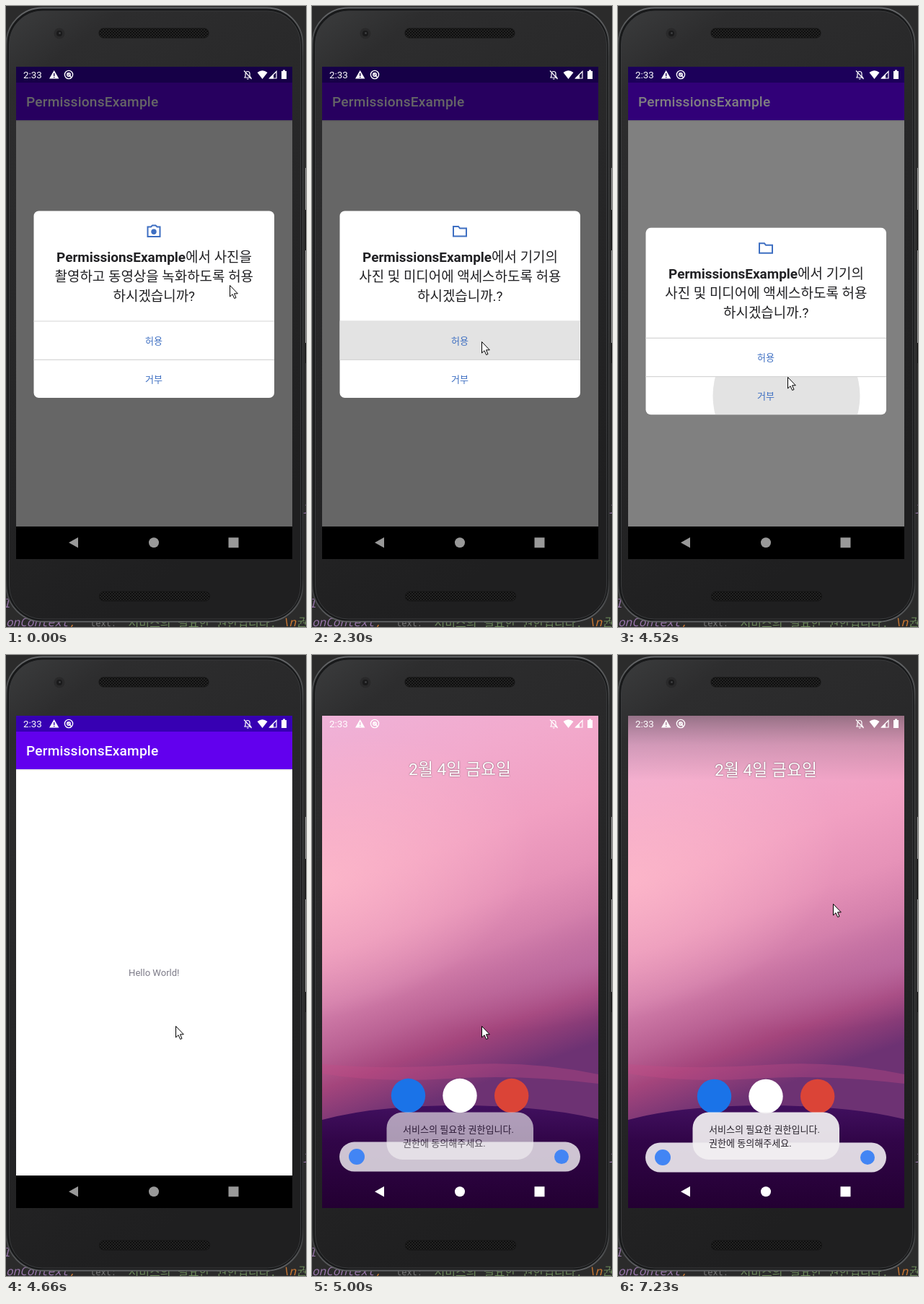
An HTML page that plays this animation: 416x859 px, repeating every 7480 ms.

```html
<!DOCTYPE html>
<html lang="ko">
<head>
<meta charset="utf-8">
<style>
html, body { margin: 0; width: 100%; height: 100%; overflow: hidden; background: #2b2b2b; }
svg { display: block; width: 416px; height: 859px; }
text { font-family: Roboto, "Noto Sans CJK KR", "Noto Sans CJK", sans-serif; white-space: pre; }
.code { font: italic 16px "Noto Sans Mono", "Noto Sans CJK KR", monospace; }
.ask { font-size: 18.95px; fill: #212124; text-anchor: middle; }
.button { font-size: 13.05px; fill: #3e6fc2; text-anchor: middle; }
.note { font-size: 13.05px; fill: #28232c; }
.icon { fill: none; stroke: #3e6fc2; stroke-width: 2; }
</style>
</head>
<body>
<svg viewBox="0 0 416 859">
  <defs>
    <linearGradient id="body" x2=".35" y2="1">
      <stop stop-color="#3b3c3d"/><stop offset=".12" stop-color="#2d2d2e"/><stop offset="1" stop-color="#1f1f20"/>
    </linearGradient>
    <linearGradient id="rim" x2="0" y2="1">
      <stop stop-color="#66686a"/><stop offset=".08" stop-color="#3b3c3d"/><stop offset=".93" stop-color="#303132"/><stop offset="1" stop-color="#606264"/>
    </linearGradient>
    <linearGradient id="sky" x2=".2" y2="1">
      <stop stop-color="#efb2d8"/><stop offset=".17" stop-color="#f2aacd"/><stop offset=".34" stop-color="#f1a0c2"/>
      <stop offset=".47" stop-color="#e692b8"/><stop offset=".57" stop-color="#d37fab"/><stop offset=".66" stop-color="#ba6294"/>
      <stop offset=".73" stop-color="#a4457c"/><stop offset=".83" stop-color="#6d3273"/>
    </linearGradient>
    <radialGradient id="glow" gradientUnits="userSpaceOnUse" cx="0" cy="0" r="1" gradientTransform="translate(14 310) rotate(-15) scale(300 190)">
      <stop stop-color="#ffbccb" stop-opacity=".75"/><stop offset="1" stop-color="#ffbccb" stop-opacity="0"/>
    </radialGradient>
    <radialGradient id="dusk" gradientUnits="userSpaceOnUse" cx="0" cy="0" r="1" gradientTransform="translate(397 425) rotate(-15) scale(250 75)">
      <stop stop-color="#c47cb4" stop-opacity=".4"/><stop offset="1" stop-color="#c47cb4" stop-opacity="0"/>
    </radialGradient>
    <linearGradient id="hills" x2="0" y2="1">
      <stop stop-color="#41105f"/><stop offset=".35" stop-color="#310548"/><stop offset="1" stop-color="#230032"/>
    </linearGradient>
    <linearGradient id="shade" x2="0" y2="1">
      <stop stop-color="#5a4852" stop-opacity=".6"/><stop offset=".45" stop-color="#745767" stop-opacity=".25"/><stop offset="1" stop-color="#745767" stop-opacity="0"/>
    </linearGradient>
    <pattern id="mesh" width="4" height="4" patternUnits="userSpaceOnUse">
      <rect width="4" height="4" fill="#232323"/><circle cx="1" cy="1" r="1.1" fill="#0b0b0b"/><circle cx="3" cy="3" r="1.1" fill="#0b0b0b"/>
    </pattern>
    <clipPath id="screen"><path d="M14 84H397V765H14z"/></clipPath>
    <clipPath id="allowArea"><path d="M38.5 436.5H371.5V489H38.5z"/></clipPath>
    <clipPath id="denyArea"><path d="M38.5 489.5H371.5V535a7 7 0 0 1-7 7H45.5a7 7 0 0 1-7-7z"/></clipPath>
  </defs>

  <rect width="416" height="859" fill="#2b2b2b"/>
  <text class="code" y="832" x="-4" fill="#9876aa">l</text>
  <text class="code" y="702" x="411" fill="#9876aa">l</text>
  <text class="code" y="858" fill="#9876aa">onContext<tspan fill="#cc7832">,</tspan></text>
  <text class="code" x="117" y="858" fill="#787878" style="font-style:normal;font-size:12px">text:</text>
  <text class="code" x="160" y="859" fill="#6a8759" style="font-style:normal">"서비스의 필요한 권한입니다.</text>
  <text class="code" x="383" y="858" fill="#cc7832">\n<tspan fill="#6a8759">권</tspan></text>
  <path d="M415.5 224V282M415.5 338V466" stroke="#999"/>
  <path d="M415.5 282V338M415.5 466V494" stroke="#111"/>

  <rect x=".5" y="2.5" width="411" height="849" rx="50" fill="#18191a" stroke="url(#rim)" stroke-width="2"/>
  <rect x="4.5" y="7" width="404" height="841" rx="46" fill="url(#body)" stroke="#3a3b3d"/>
  <circle cx="74" cy="38" r="7.5" fill="#29292a"/><circle cx="74" cy="38" r="4" fill="#1a1a1b"/><circle cx="74.5" cy="37.5" r="1.3" fill="#444648"/>
  <rect x="129" y="31" width="152" height="13" rx="6" fill="url(#mesh)" stroke="#151515"/>
  <rect x="129.5" y="810" width="153" height="13" rx="6" fill="url(#mesh)" stroke="#151515"/>

  <g clip-path="url(#screen)">
    <g id="home">
      <rect x="14" y="84" width="383" height="681" fill="url(#sky)"/>
      <rect x="14" y="84" width="383" height="560" fill="url(#glow)"/>
      <rect x="14" y="84" width="383" height="560" fill="url(#dusk)"/>
      <path d="M14 566Q110 574 205 567T397 580V593Q290 580 190 586T14 579z" fill="#c44c84" opacity=".35"/>
      <path d="M14 643Q60 631 110 627Q205 619 300 627Q350 631 397 642V765H14z" fill="url(#hills)"/>
      <rect id="topShade" x="14" y="84" width="383" height="90" fill="url(#shade)"/>
      <g id="content">
        <text x="205" y="166.5" text-anchor="middle" font-size="22.8" fill="#fff" style="text-shadow:0 0 2px #0008">2월 4일 금요일</text>
        <rect id="search" x="38" y="674.5" width="334" height="41" rx="20.5" fill="#f3f1f4"/>
        <circle cx="62" cy="695" r="11" fill="#4285f4"/>
        <circle cx="346" cy="695" r="10" fill="#4285f4"/>
        <circle cx="133.5" cy="610.5" r="23.7" fill="#1a73e8"/>
        <circle cx="205" cy="610.5" r="23.7" fill="#fff"/>
        <circle cx="276.7" cy="610.5" r="23.7" fill="#db4437"/>
      </g>
    </g>

    <g id="app">
      <rect x="14" y="84" width="383" height="640" fill="#fff"/>
      <text x="205.3" y="444" text-anchor="middle" font-size="13.05" fill="#7d7b88">Hello World!</text>
      <rect x="14" y="158" width="383" height="1.5" opacity=".09"/>
      <rect x="14" y="106" width="383" height="52" fill="#6200ee"/>
      <rect x="14" y="84" width="383" height="22" fill="#3700b3"/>
      <text x="28" y="139.3" font-size="19.1" font-weight="500" letter-spacing=".2" fill="#fff">PermissionsExample</text>
      <rect id="scrim" x="14" y="84" width="383" height="640"/>
      <rect x="14" y="720" width="383" height="45"/>
    </g>

    <g id="dialog">
      <rect x="38.5" y="283.5" width="333.5" height="258.5" rx="7" fill="#fff"/>
      <g clip-path="url(#allowArea)"><circle id="allowWave" cx="235" cy="463" fill="#e3e3e3"/></g>
      <g clip-path="url(#denyArea)"><circle id="denyWave" cx="233.5" cy="516" fill="#e3e3e3"/></g>
      <path d="M38.5 436H372M38.5 489.3H372" stroke="#d6d6d6" stroke-width="1.2"/>
      <g id="camera">
        <path class="icon" d="M197 305.5H201L203 303.5H207.5L209.5 305.5H213.5V319H196.5V305.5z"/>
        <circle cx="205" cy="312.3" r="3.7" fill="#3e6fc2"/>
      </g>
      <path id="folder" class="icon" d="M196 305H203L205 307.5H214V318.5H196z"/>
      <text class="ask" x="205.5" y="353.5"><tspan font-weight="700">PermissionsExample</tspan>에서 <tspan id="line1"></tspan></text>
      <text class="ask" id="line2" x="205.3" y="380.5"></text>
      <text class="ask" id="line3" x="205.3" y="407.5"></text>
      <text class="button" x="205" y="467.5">허용</text>
      <text class="button" x="205" y="520.5">거부</text>
    </g>

    <g fill="#fff">
      <text x="24" y="100" font-size="13.4">2:33</text>
      <path d="M60 100.5L66.7 89L73.4 100.5zM66 93V97H67.4V93zM66 98V99.3H67.4V98z" fill-rule="evenodd"/>
      <g fill="none" stroke="#fff" stroke-width="1.4">
        <circle cx="87" cy="95" r="5.6"/><circle cx="87" cy="95" r="2.3"/><path d="M85 93L91 99"/>
        <path d="M331 99H339.5L338 97V93.5Q338 90.5 335 90.5T332 93.5V97zM330 89.5L340.5 101M334 101H336.5" stroke-width="1.2"/>
        <path d="M365.5 100H375V90.5z" stroke-width="1.2"/>
      </g>
      <path d="M348.5 92Q355.5 86.5 362.5 92L355.5 101z"/>
      <path d="M365 100.5L371 94.5V100.5z"/>
      <path d="M382 90H384V88.5H387V90H389V101H382z"/>
    </g>
    <g id="nav"><path d="M87 742.3L100 735V749.6z"/><circle cx="205" cy="742.3" r="7"/><rect x="308.5" y="735.3" width="14" height="14"/></g>

    <g id="toast">
      <rect x="103.5" y="632.5" width="203.5" height="65.5" rx="22" fill="#f1eff2" opacity=".93"/>
      <text class="note" x="126" y="660.5">서비스의 필요한 권한입니다.</text>
      <text class="note" x="126" y="679.5">권한에 동의해주세요.</text>
    </g>
  </g>

  <path id="cursor" d="M.5.5V16L4 12.7L6.7 18.5L9 17.5L6.500 11.8H11.3z" fill="#fff" stroke="#000"/>
</svg>
<script>
const LOOP = 7480;
const el = id => document.getElementById(id);
const set = (id, attrs) => { for (const k in attrs) el(id).setAttribute(k, attrs[k]); };
const span = (t, a, b) => Math.min(1, Math.max(0, (t - a) / (b - a)));
const mix = (a, b, p) => a + (b - a) * p;
const easeOut = p => 1 - (1 - p) ** 2;

// time, x, y of the pointer tip
const path = [
  [0, 310, 386], [60, 310, 386], [200, 299, 463], [850, 299, 463], [1400, 285, 380], [1540, 283, 381],
  [1600, 283, 381], [1980, 236, 462], [2030, 235, 464], [3030, 235, 464], [3530, 235, 513],
  [6230, 235, 513], [6440, 318, 494], [6650, 304, 428], [6800, 298, 400], [6950, 298, 357],
  [7020, 298, 350], [7230, 298, 344], [LOOP, 298, 344]
];

const prompts = [
  ["사진을", "촬영하고 동영상을 녹화하도록 허용", "하시겠습니까?"],
  ["기기의", "사진 및 미디어에 액세스하도록 허용", "하시겠습니까.?"]
];
let shown = -1;

function showPrompt(n) {
  if (n === shown) return;
  shown = n;
  prompts[n].forEach((line, i) => el("line" + (i + 1)).textContent = line);
  set("camera", { opacity: 1 - n });
  set("folder", { opacity: n });
}

function draw(t) {
  const i = Math.max(1, path.findIndex(k => k[0] > t));
  const [a, b] = [path[i - 1], path[i]];
  const p = span(t, a[0], b[0]);
  set("cursor", { transform: `translate(${mix(a[1], b[1], p)} ${mix(a[2], b[2], p)})` });

  showPrompt(t < 2200 ? 0 : 1);
  set("allowWave", { r: t < 2040 ? 0 : mix(30, 200, easeOut(span(t, 2040, 2320))), opacity: 1 - span(t, 2300, 2580) });
  set("denyWave", { r: t < 4390 ? 0 : mix(40, 102, span(t, 4390, 4520)) });

  // dialog drops away and uncovers the app
  const drop = Math.max(0, (t - 4450) / 70);
  set("dialog", { transform: `translate(0 ${Math.min(90, 22.7 * drop * drop)})`, opacity: 1 - span(t, 4530, 4650) });
  set("scrim", { opacity: t < 4520 ? mix(.6, .5, span(t, 4450, 4520)) : mix(.5, 0, span(t, 4520, 4650)) });

  // app gives way to the home screen
  const leave = span(t, 4670, 4920);
  set("app", { opacity: 1 - leave, transform: `translate(0 ${30 * leave * leave})` });
  set("nav", { fill: leave > .5 ? "#fff" : "#999" });
  set("content", { transform: `translate(0 ${-16 * (1 - span(t, 4670, 5210)) ** 3})` });
  const settle = span(t, 5470, 6170);
  set("topShade", { opacity: settle });
  set("search", { opacity: mix(.81, .89, settle) });
  set("toast", { opacity: span(t, 4850, 5070) });
}

function tick() {
  draw(performance.now() % LOOP);
  requestAnimationFrame(tick);
}
tick();
</script>
</body>
</html>
```
